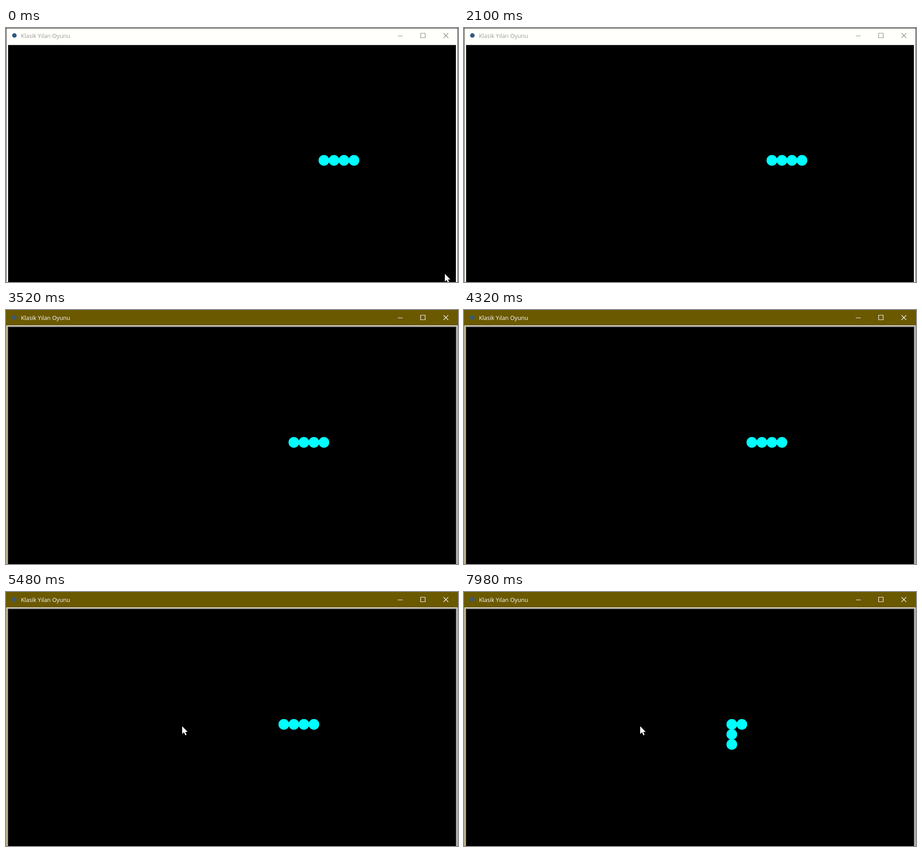
Recreate the animation shown at these times as an HTML page with a canvas. Size 998 by 561 pixels, loop 8000 ms.

```html
<!DOCTYPE html>
<html lang="tr">
<head>
<meta charset="utf-8">
<title>Klasik Yılan Oyunu</title>
<style>
  html, body { margin: 0; width: 100%; height: 100%; overflow: hidden; background: #000; }
  canvas { display: block; width: 998px; height: 561px; }
</style>
</head>
<body>
<canvas id="stage" width="998" height="561"></canvas>
<script>
const ctx = document.getElementById('stage').getContext('2d');
const LOOP = 8000, MOVE_TIME = 1128, CELL = 22.13, ACTIVATE = 3100;

// Nested window frames: [colour, left, top, right], each painted over the last.
const inactive = {
  ink: '#999', button: '#888',
  frames: [['#25251c', 0, 0, 998], ['#fffffb', 1, 1, 997], ['#999', 4, 37, 994], ['#000', 5, 38, 993]]
};
const active = {
  ink: '#fff', button: '#fff',
  frames: [['#6b5900', 0, 0, 998], ['#e4e4e0', 1, 34, 997], ['#696969', 3, 36, 995], ['#000', 5, 38, 993]]
};

// Route of the snake's head; its tail begins on the right.
const route = [];
for (let i = 8; i >= 0; i--) route.push([591.3 + i * CELL, 292.4]);
route.push([591.3, 292.4 + CELL], [591.3, 292.4 + 2 * CELL]);

// Pointer visits: [time, x, y]
const visits = [
  [[0, 969, 543], [20, 969, 543], [120, 969, 561]],
  [[4480, 296, 561], [4640, 322.5, 366], [4740, 340, 340], [4920, 381, 297], [5060, 389, 296.5], [8000, 389, 296.5]]
];

function drawWindow(theme) {
  for (const [color, left, top, right] of theme.frames) {
    ctx.fillStyle = color;
    ctx.fillRect(left, top, right - left, 561 - top);
  }
  ctx.fillStyle = '#35597f';
  ctx.beginPath();
  ctx.arc(18.5, 16.5, 5, 0, 7);
  ctx.fill();

  ctx.fillStyle = theme.ink;
  ctx.font = '12.7px "Open Sans", "Noto Sans", sans-serif';
  ctx.fillText('Klasik Yılan Oyunu', 33, 22);

  ctx.strokeStyle = theme.button;
  ctx.lineWidth = 1.2;
  ctx.beginPath();
  ctx.moveTo(865, 17.5); ctx.lineTo(876, 17.5);
  ctx.rect(915.5, 11.5, 10, 10);
  ctx.moveTo(966, 11.5); ctx.lineTo(976.5, 22);
  ctx.moveTo(976.5, 11.5); ctx.lineTo(966, 22);
  ctx.stroke();
}

function drawSnake(moves) {
  ctx.fillStyle = '#0ff';
  for (const [x, y] of route.slice(moves, moves + 4)) {
    ctx.beginPath();
    ctx.arc(x, y, 11.8, 0, 7);
    ctx.fill();
  }
}

function pointerAt(time) {
  for (const path of visits) {
    for (let i = 1; i < path.length; i++) {
      const [t0, x0, y0] = path[i - 1], [t1, x1, y1] = path[i];
      if (time >= t0 && time < t1) {
        const p = (time - t0) / (t1 - t0);
        return [x0 + (x1 - x0) * p, y0 + (y1 - y0) * p];
      }
    }
  }
}

const arrow = new Path2D('M0 0V17L4 13.3L7 20L9.7 18.9L6.8 12.4H12Z');

function drawPointer(position) {
  if (!position) return;
  ctx.save();
  ctx.translate(...position);
  ctx.fillStyle = '#fff';
  ctx.fill(arrow);
  ctx.restore();
}

function render(now) {
  const time = now % LOOP;
  drawWindow(time < ACTIVATE ? inactive : active);
  drawSnake(Math.floor(time / MOVE_TIME));
  drawPointer(pointerAt(time));
}

let start;
function tick(now) {
  start ??= now;
  render(now - start);
  requestAnimationFrame(tick);
}
render(0);
requestAnimationFrame(tick);
</script>
</body>
</html>
```
